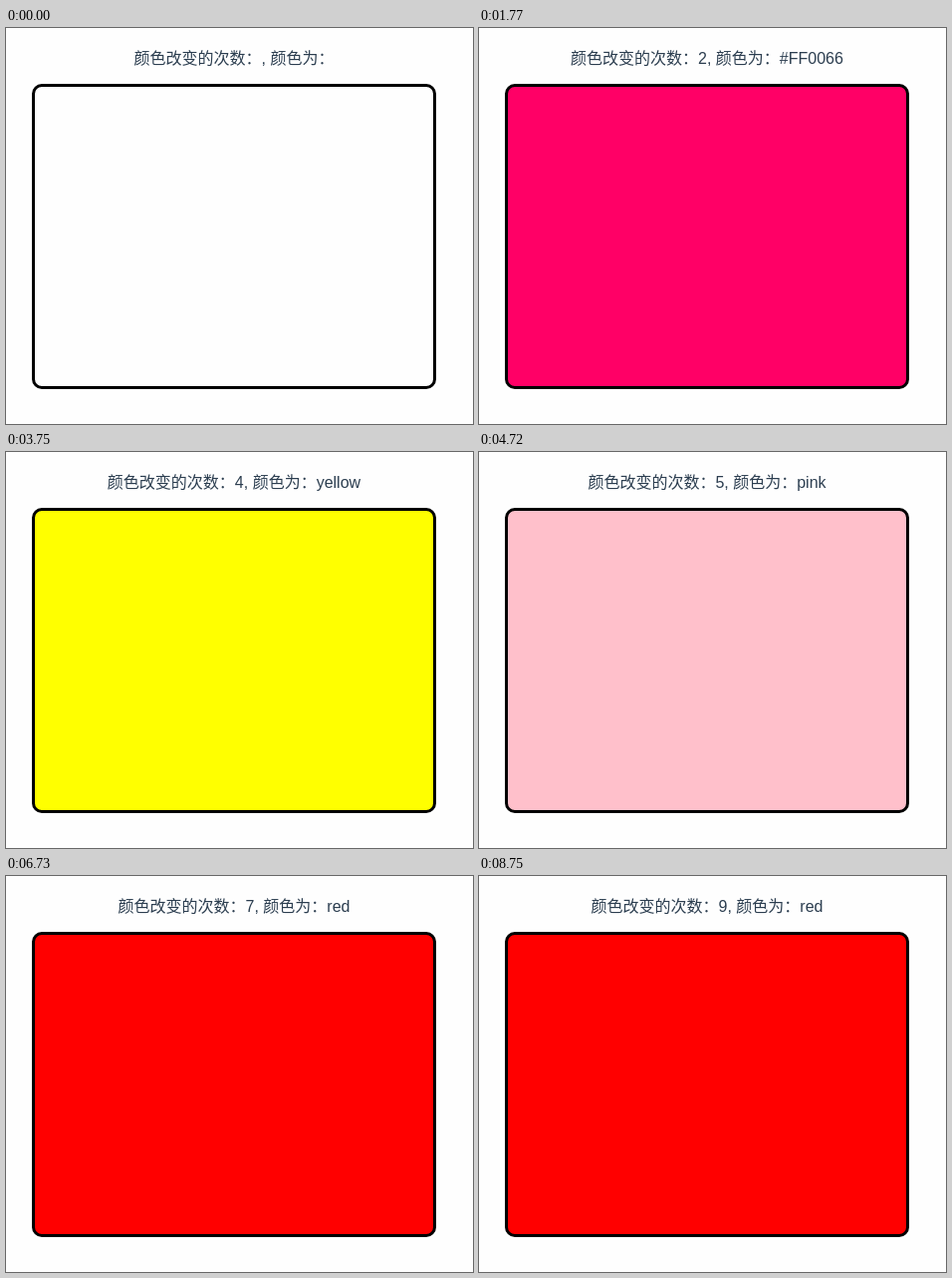
Recreate the animation shown at these times as an HTML page. Size 469 by 397 pixels, loop 9.17 s.

```html
<!DOCTYPE html>
<html lang="zh-CN">
<head>
<meta charset="utf-8">
<style>
  html, body { margin: 0; width: 100%; height: 100%; overflow: hidden; background: #fefefe; }
  svg { display: block; }
  text { font: 16px "Liberation Sans", "Noto Sans CJK SC", "Noto Sans CJK", sans-serif; fill: #2c3e50; text-anchor: middle; }
</style>
</head>
<body>
<svg width="469" height="397">
  <text id="label" x="229" y="36"></text>
  <rect id="box" x="27.5" y="57.5" width="403" height="303" rx="8.5" stroke="#000" stroke-width="3"/>
</svg>
<script>
  const LOOP = 9170;
  // [start time in ms, colour]; the index is the change count
  const steps = [
    [0, ''], [750, 'red'], [1770, '#FF0066'], [2750, 'pink'], [3750, 'yellow'],
    [4720, 'pink'], [5760, 'yellow'], [6730, 'red'], [7720, 'yellow'], [8750, 'red']
  ];
  const label = document.getElementById('label');
  const box = document.getElementById('box');
  let shown = -1;

  function draw() {
    const t = performance.now() % LOOP;
    const count = steps.filter(([start]) => start <= t).length - 1;
    if (count !== shown) {
      shown = count;
      const color = steps[count][1];
      label.textContent = `颜色改变的次数：${count || ''}, 颜色为：${color}`;
      box.setAttribute('fill', color || 'none');
    }
    requestAnimationFrame(draw);
  }
  draw();
</script>
</body>
</html>
```
